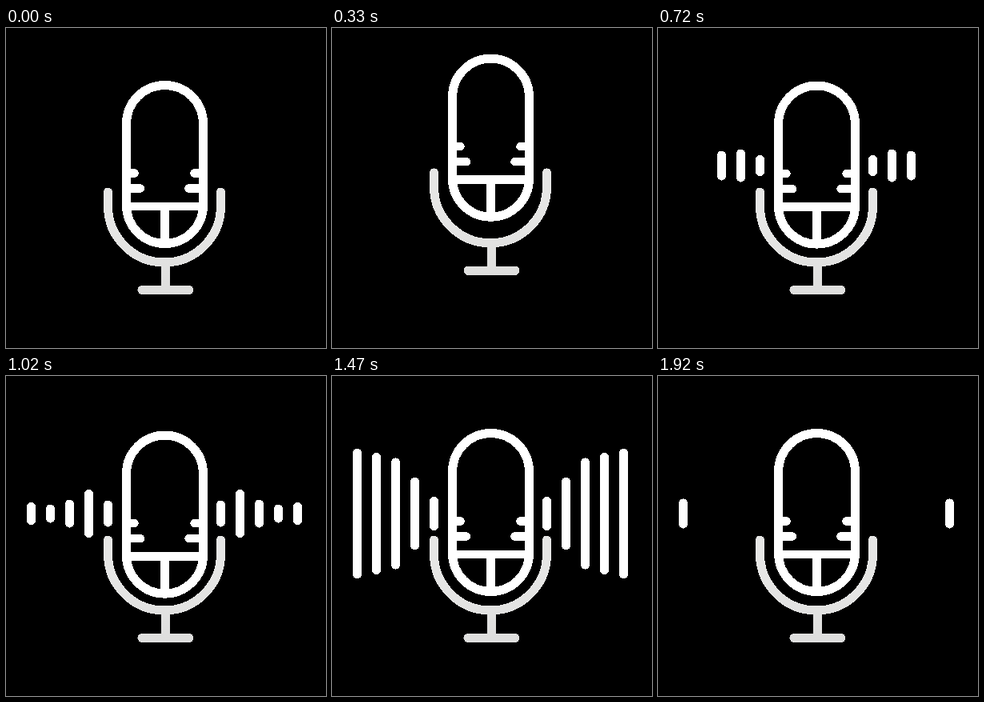
An HTML page for the animation above (3950 ms loop, 400 by 400 pixels).

```html
<!DOCTYPE html>
<html lang="en">
<head>
<meta charset="utf-8">
<title>Microphone</title>
<style>
  html, body { margin: 0; width: 100%; height: 100%; overflow: hidden; background: #000; }
  svg { display: block; width: 100%; height: 100%; }
</style>
</head>
<body>
<svg viewBox="0 0 400 400" fill="none" stroke="#fff" stroke-width="11" stroke-linecap="round" shape-rendering="crispEdges">
  <linearGradient id="shade" gradientUnits="userSpaceOnUse" x1="0" y1="250" x2="0" y2="333">
    <stop stop-color="#e6e6e5"/>
    <stop offset="1" stop-color="#dededd"/>
  </linearGradient>
  <g id="stand" stroke="url(#shade)">
    <path d="M127.5 205V222.5A70.5 70.5 0 0 0 268.5 222.5V205M199.5 293V327M170 327.5H229"/>
  </g>
  <g id="capsule">
    <rect x="150.5" y="71.5" width="96" height="198" rx="48"/>
    <path d="M151 223H246M198.5 224V269M151 181.5H160.5M151 200.5H168M246 181.5H235.5M246 200.5H228.5" stroke-width="10.5"/>
  </g>
  <g id="bars"></g>
</svg>
<script>
const LOOP = 3950, STEP = 30, HOLD = 1920, HOP = 630;
const MID = 172, CAP = 5.5, GAP = 24, FADE = 1680;
const byId = id => document.getElementById(id);
const clamp = u => Math.max(0, Math.min(1, u));
const ease = u => u * u * (3 - 2 * u);

// Half heights of the bars, innermost first, at the key moments of the wave.
const fan = [0, 1, 2, 3, 4];
const poses = [
  { at: 570, half: fan.map(() => 0) },
  { at: 720, half: [13, 20.5, 18.5, 0, 0] },
  { at: 1020, half: [16.5, 30, 17.5, 11.5, 14] },
  { at: 1260, half: [14.5, 39, 63.5, 59.5, 54] },
  { at: FADE, half: fan.map(i => 19.5 + 14.2 * i) }
];

// One soft bump, 0 to 1 to 0, lasting HOP from the given start.
const bump = (t, start) => Math.sin(Math.PI * clamp((t - start) / HOP)) ** 2;

function halfHeight(i, t) {
  if (t >= FADE) {
    const u = clamp((t - FADE) / (135 + 30 * i));
    return poses.at(-1).half[i] * Math.sqrt(1 - u);
  }
  const k = poses.findIndex(p => p.at > t);
  if (k < 1) return 0;
  const a = poses[k - 1], b = poses[k];
  const u = (t - a.at) / (b.at - a.at);
  const swell = b.at === FADE ? 1 + 0.25 * Math.sin(Math.PI * u) : 1;
  return (a.half[i] + (b.half[i] - a.half[i]) * ease(u)) * swell;
}

const bars = fan.map(i => [127.5 - GAP * i, 268.5 + GAP * i].map(x => {
  const line = document.createElementNS("http://www.w3.org/2000/svg", "line");
  line.setAttribute("x1", x);
  line.setAttribute("x2", x);
  return byId("bars").appendChild(line);
}));

const lift = (id, y) => byId(id).setAttribute("transform", `translate(0 ${y})`);

function draw(ms) {
  const t = Math.min(HOLD, Math.floor(ms / STEP) * STEP);
  const jump = bump(t, 0);
  lift("capsule", 3 * bump(t, HOP) - 33.5 * jump);
  lift("stand", -24.3 * jump);
  bars.forEach((pair, i) => {
    const h = halfHeight(i, t), reach = Math.max(0, h - CAP);
    for (const line of pair) {
      line.setAttribute("y1", MID - reach);
      line.setAttribute("y2", MID + reach);
      line.setAttribute("stroke-width", 2 * Math.min(h, CAP));
      line.setAttribute("visibility", h > 0.5 ? "visible" : "hidden");
    }
  });
}

const start = performance.now();
function tick() {
  draw((performance.now() - start) % LOOP);
  requestAnimationFrame(tick);
}
tick();
</script>
</body>
</html>
```
